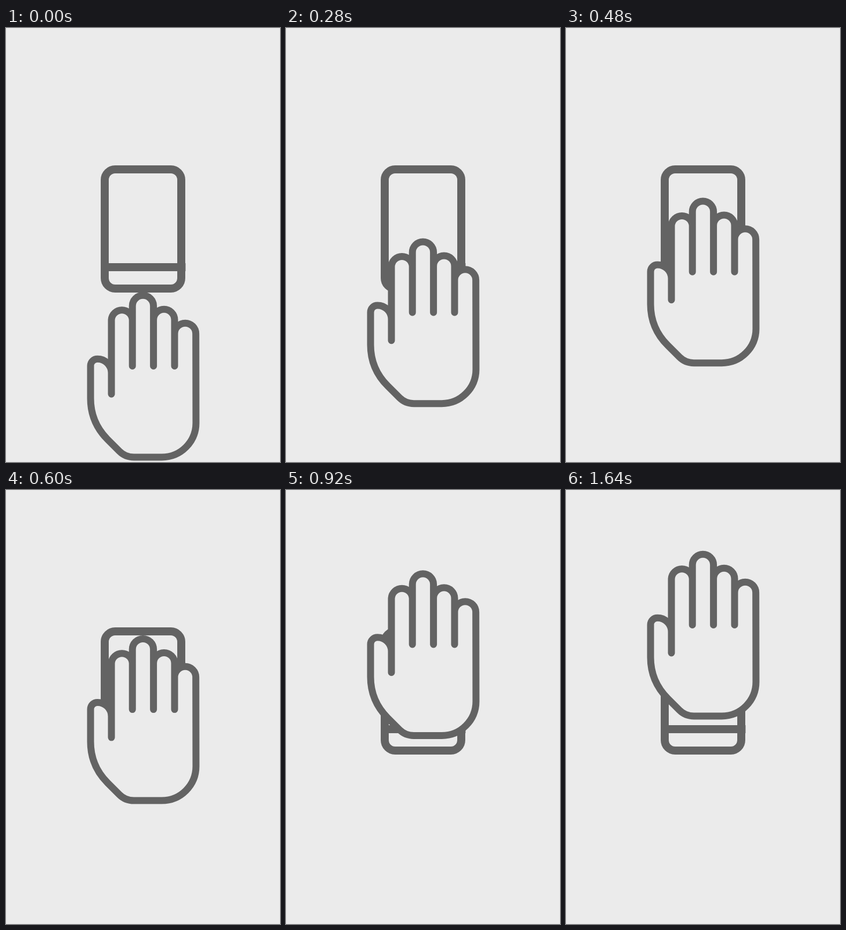
Recreate the animation shown at these times as an HTML page. Size 512 by 812 pixels, loop 2000 ms.

```html
<!DOCTYPE html>
<html lang="en">
<head>
<meta charset="utf-8">
<title>Hand and phone</title>
<style>
  html, body { margin: 0; width: 100%; height: 100%; overflow: hidden; background: #ebebeb; }
  svg { display: block; width: 100%; height: 100%; }
  path, rect { fill: none; stroke: #636363; stroke-width: 13; stroke-linecap: round; stroke-linejoin: round; }
  #phone > * { stroke-width: 15; stroke-linecap: butt; }
  #hand { fill: #ebebeb; }
</style>
</head>
<body>
<svg viewBox="0 0 512 812">
  <g id="phone">
    <rect x="184.5" y="264.5" width="143" height="223" rx="19.5"/>
    <path d="M184.5 447.5H335.5"/>
  </g>
  <path id="hand" d="M197 305V166A19.65 19.65 0 0 1 236.2 166V252.5V140A19.65 19.65 0 0 1 275.6 140V252.5V166
    A19.65 19.65 0 0 1 315 166V252.5V192A19.85 19.85 0 0 1 354.7 192L355 359A64 64 0 0 1 291 423H239
    C229 423 219 419 212 412L190 390C169 369 158 342 158 313V252A12.8 12.8 0 0 1 171 239.3A26 26 0 0 1 197 265Z"/>
  <path id="marks" d="M95.5 242.5L104.5 252M90.5 289H103.5M104.5 326L95.5 335.5
    M417 236.5L408 245.5M409 282.5H422M408 319.5L417 329"/>
</svg>
<script>
  const LOOP = 2000, STEP = 40, TRAVEL = 380;
  const hand = document.getElementById('hand');
  const marks = document.getElementById('marks');
  const start = performance.now();

  function draw(now) {
    const elapsed = Math.max(0, now - start) % LOOP;
    const t = Math.floor(elapsed / STEP) * STEP;
    // steady one-second rise, beginning just after the loop starts
    const rise = Math.min(1, Math.max(0, (t - 16) / 1000));
    hand.setAttribute('transform', `translate(0 ${TRAVEL * (1 - rise)})`);
    marks.style.display = t >= 1040 && t < 1640 ? '' : 'none';
    requestAnimationFrame(draw);
  }
  draw(start);
</script>
</body>
</html>
```
